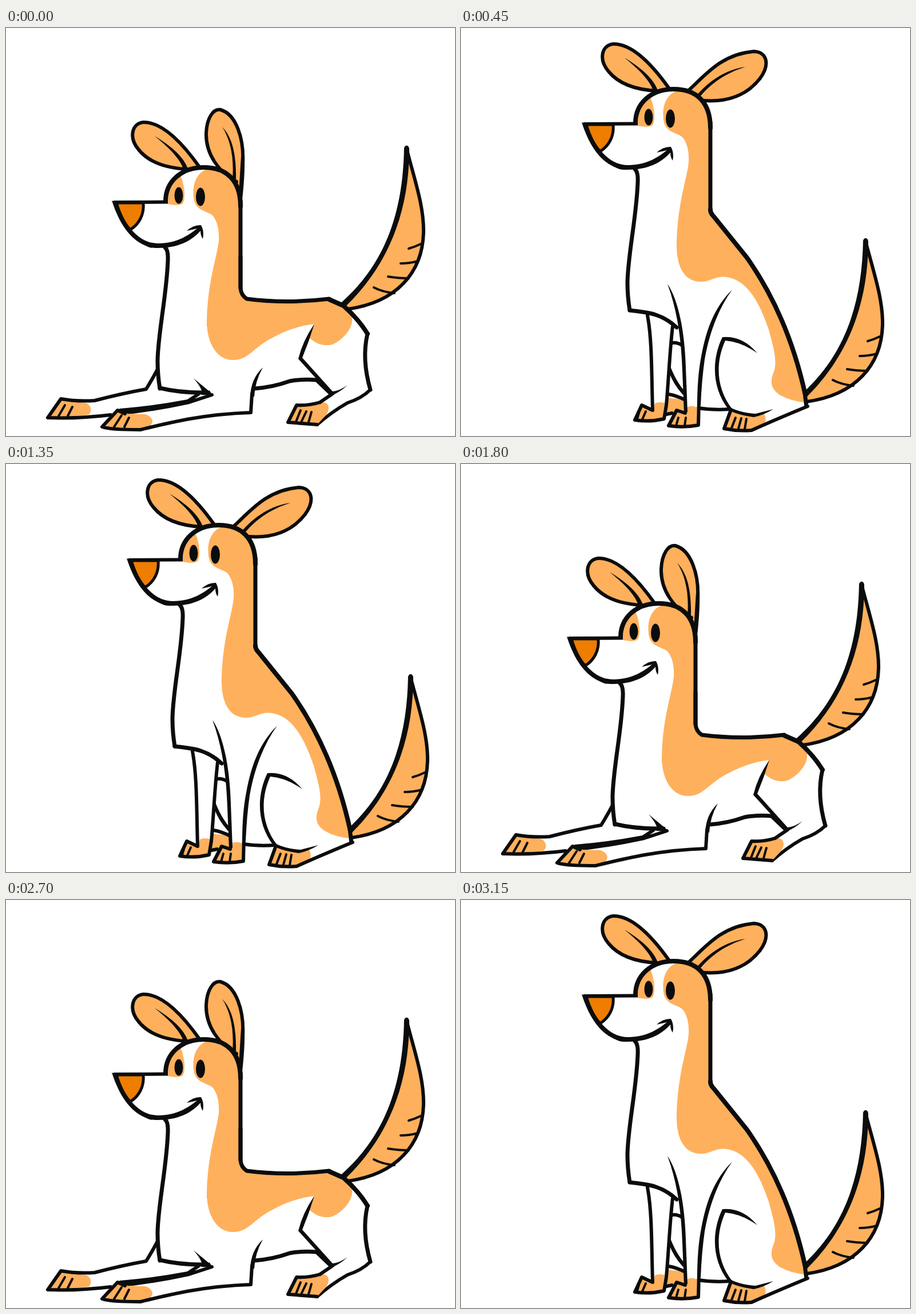
Recreate the animation shown at these times as an HTML page. Size 785x714 px, loop 3.6 s.

```html
<!DOCTYPE html>
<html lang="en">
<head>
<meta charset="utf-8">
<title>Dog sitting and lying</title>
<style>
  html, body { margin: 0; width: 100%; height: 100%; overflow: hidden; background: #fff; }
  svg { display: block; width: 100%; height: 100%; }
  path { fill: none; stroke: #0b0c0d; stroke-width: 6; stroke-linejoin: round; stroke-linecap: round; }
  .fur, .skin, .ink { stroke: none; }
  .fur, .fur-line { fill: #ffb05c; }
  .skin { fill: #fff; }
  .ink, ellipse { fill: #0b0c0d; }
  .nose { fill: #ee7d00; stroke-width: 5; }
  .thin { stroke-width: 4; }
  .mid { stroke-width: 7; }
  .bold { stroke-width: 8; }
  .miter { stroke-linejoin: miter; stroke-linecap: butt; }
  .lie { animation: lie 900ms step-end infinite; }
  .sit { animation: sit 900ms step-end infinite; }
  @keyframes lie { 0% { visibility: visible; } 50%, 100% { visibility: hidden; } }
  @keyframes sit { 0% { visibility: hidden; } 50%, 100% { visibility: visible; } }
</style>
</head>
<body>
<svg viewBox="0 0 785 714">
  <defs>
    <g id="tail">
      <path class="fur" d="M707 372C722 430 738 475 737 520C735 590 690 642 604 654L590 654C676 570 704 480 707 372Z"/>
      <path d="M707 372C722 430 738 475 737 520C735 590 690 642 604 654"/>
      <path class="ink" d="M703 372C705 365 712 367 712 374C712 480 678 575 600 650L588 647C673 575 701 480 703 372Z"/>
      <path class="thin" d="M732 540Q722 545 711 548M727 570Q712 574 697 574M711 600Q692 600 675 597M686 626Q665 624 650 616"/>
    </g>

    <g id="left-ear">
      <path class="fur-line" d="M364 106C335 65 300 27 266 28C246 30 240 55 258 76C275 97 305 108 342 110"/>
      <path class="ink" d="M286 52C312 68 338 88 345 112L337 112C331 93 314 75 286 52Z"/>
    </g>

    <g id="head">
      <path class="skin" d="M212 166L306 166C306 130 335 106 372 106C415 106 436 130 436 170L436 320L400 370L298 370L308 245C265 250 232 215 212 166Z"/>
      <path class="fur" d="M378 110C359 116 351 137 354 160C356 182 374 182 386 190C396 200 399 218 398 235C395 265 377 310 377 385L436 385L436 165C434 130 410 107 378 110Z"/>
      <path class="fur" d="M331 122C338 135 341 164 334 171C328 174 318 173 309 171C309 148 313 130 331 122Z"/>
      <ellipse cx="328" cy="156" rx="7.5" ry="14.5"/>
      <ellipse cx="366" cy="158.500" rx="8" ry="16"/>
      <path class="nose" d="M219 169L266 169C268 190 258 207 243 216Q228 200 219 169Z"/>
      <path class="bold" d="M305 166C305 133 331 107 372 107C412 107 436 130 436 175"/>
      <path class="miter" d="M309 167.500L214 168"/>
      <path class="ink" d="M211 165L219 168C236 215 262 240 292 240C325 240 346 225 360 214L342 218Q354 207 367 208Q373 219 370 232Q366 226 366 218C350 236 326 248 292 248C280 248 278 248 270 244C242 232 224 205 211 165Z"/>
      <path class="mid" d="M436 165L436 318"/>
      <path class="mid" d="M304 247Q310 252 309 270C307 330 292 395 291 445Q291 470 295 494"/>
    </g>
  </defs>

  <g class="lie">
    <use href="#tail" x="-7" y="-162"/>
    <use href="#left-ear" x="-26" y="137"/>
    <path class="fur-line" d="M403 269C372 253 349 220 350 184C351 158 362 141 375 143C403 151 416 195 414 235L411 282"/>
    <path class="ink" d="M378 173C396 192 403 222 402 266L396 264C399 226 392 195 378 173Z"/>
    <path class="ink" d="M411 225L417 225Q418 255 413 300L406 305Z"/>
    <path class="skin" d="M266 500L409 455L420 474L565 474L633 535L627 580L638 633L545 694L493 690L508 659L568 638L535 614L430 631L428 673L235 703L168 698L195 668L335 641L268 631Z"/>
    <path class="fur" d="M351 512C351 555 371 581 396 581C424 582 434 557 468 541Q500 523 538 518L530 542C541 551 549 556 566 555C582 552 608 528 605 507Q590 487 565 475Q495 482 425 475Q412 470 410 445Z"/>
    <use href="#head" x="-26" y="137"/>

    <path class="mid" d="M410 400L410 455Q411 468 421 474Q490 483 565 474"/>
    <path class="bold" d="M565 475L590 486Q616 509 632 535"/>
    <path class="mid" d="M632 535C625 565 626 595 637 633"/>
    <path d="M637 633Q622 648 597 656Q569 672 544 694"/>
    <path class="ink" d="M539 518Q530 548 518 577L571 636Q583 635 597 625Q583 638 569 643L511 579Q519 547 539 518Z"/>
    <path class="mid" d="M434 631Q465 629 496 618Q518 614 543 616L566 638"/>

    <path class="fur" d="M508 660L549 655C564 653 568 664 560 677L544 694L493 690Z"/>
    <path d="M549 655Q530 661 508 660L493 690L544 694M571 640L549 655"/>
    <path class="thin" d="M515 669L507 689M525 671L516 690M534 672L529 690"/>

    <path class="fur" d="M97 651L139 656C150 660 151 672 144 677L75 682Z"/>
    <path d="M265 597Q255 616 245 632Q205 639 155 652Q124 654 96 649L73 682Q128 684 183 677"/>
    <path class="thin" d="M103 660L92 679M116 663L108 679"/>
    <path d="M200 669Q260 664 318 653L336 641M206 674Q265 667 320 655L360 642"/>

    <path class="fur" d="M195 669L213 675L244 676C258 681 260 693 248 698L232 703L169 698Z"/>
    <path d="M208 675L195 669L168 698Q182 703 235 703C280 692 340 676 428 673L430 640"/>
    <path class="thin" d="M202 678L189 698M215 682L207 698"/>
    <path class="ink" d="M427 645Q428 614 449 594Q435 619 434 645Z"/>

    <path class="mid" d="M269 630Q305 639 354 638"/>
    <path class="ink" d="M328 613L364 643L342 642Q346 634 328 613Z"/>
  </g>

  <g class="sit">
    <use href="#tail"/>
    <use href="#left-ear"/>
    <path class="fur-line" d="M397 110C425 85 455 45 512 41C536 42 540 65 523 88C500 118 465 130 424 127"/>
    <path class="ink" d="M497 68C463 73 434 92 411 119L417 121C438 96 463 79 497 68Z"/>
    <path class="skin" d="M300 370L436 320L500 402C550 475 582 555 605 662L508 704L460 700L472 668L415 665L414 695L364 695L392 650L376 523L295 494Z"/>
    <path class="fur" d="M377 375C376 421 392 443 418 444C436 445 444 433 465 436C503 441 524 487 538 528C547 561 554 585 546 604C539 622 544 633 557 642Q578 654 603 655C586 560 550 475 500 402L436 320Z"/>
    <use href="#head"/>
    <path class="bold" d="M436 318Q436 324 442 330L500 402C550 473 583 555 602 642"/>
    <path class="mid miter" d="M601 638L604 664"/>

    <path class="fur" d="M359 647L390 650L392 682L367 676L358 673Z"/>
    <path d="M370 551Q378 550 386 555M363 641Q376 643 390 650M359 676L369 674M415 665Q440 669 470 667"/>
    <path class="ink" d="M364 587Q376 620 394 639L388 642Q371 623 364 603Z"/>
    <path class="mid" d="M295 494C322 498 348 497 377 524"/>

    <path class="fur" d="M316 660L336 669L339 657Q347 653 358 657L357 684L305 686Z"/>
    <path d="M326 503C334 545 333 600 335 669L316 660L304 686Q330 690 355 684L359 660C363 615 365 565 370 522"/>
    <path class="thin" d="M323 671L317 685M311 674L308 684"/>

    <path class="fur" d="M377 669L392 673L394 664Q403 659 413 664L415 695L364 695Z"/>
    <path class="ink" d="M361 448C379 474 391 527 393 594L396 672L390 674L387 600C385 544 378 494 361 448Z"/>
    <path d="M392 674L377 669L363 696Q389 700 415 695L416 652"/>
    <path class="ink" d="M474 458C449 493 434 535 426 580Q421 615 419 660L413 660Q413 610 420 575C429 525 444 488 474 458Z"/>
    <path class="thin" d="M380 682L376 696M393 682L391 696"/>

    <path class="ink" d="M457 541Q492 538 518 569Q490 549 462 547C445 585 445 630 475 668L468 668C438 630 438 580 457 541Z"/>
    <path class="fur" d="M472 668L511 678L530 675Q536 686 529 695L508 705L460 701Z"/>
    <path d="M606 662Q548 686 508 704Q484 706 460 701L472 668"/>
    <path class="ink" d="M470 664Q491 674 515 675L546 667Q530 677 512 681Q488 678 470 670Z"/>
    <path class="thin" d="M480 682L473 700M490 683L485 701M499 684L496 702"/>
  </g>
</svg>
</body>
</html>
```
